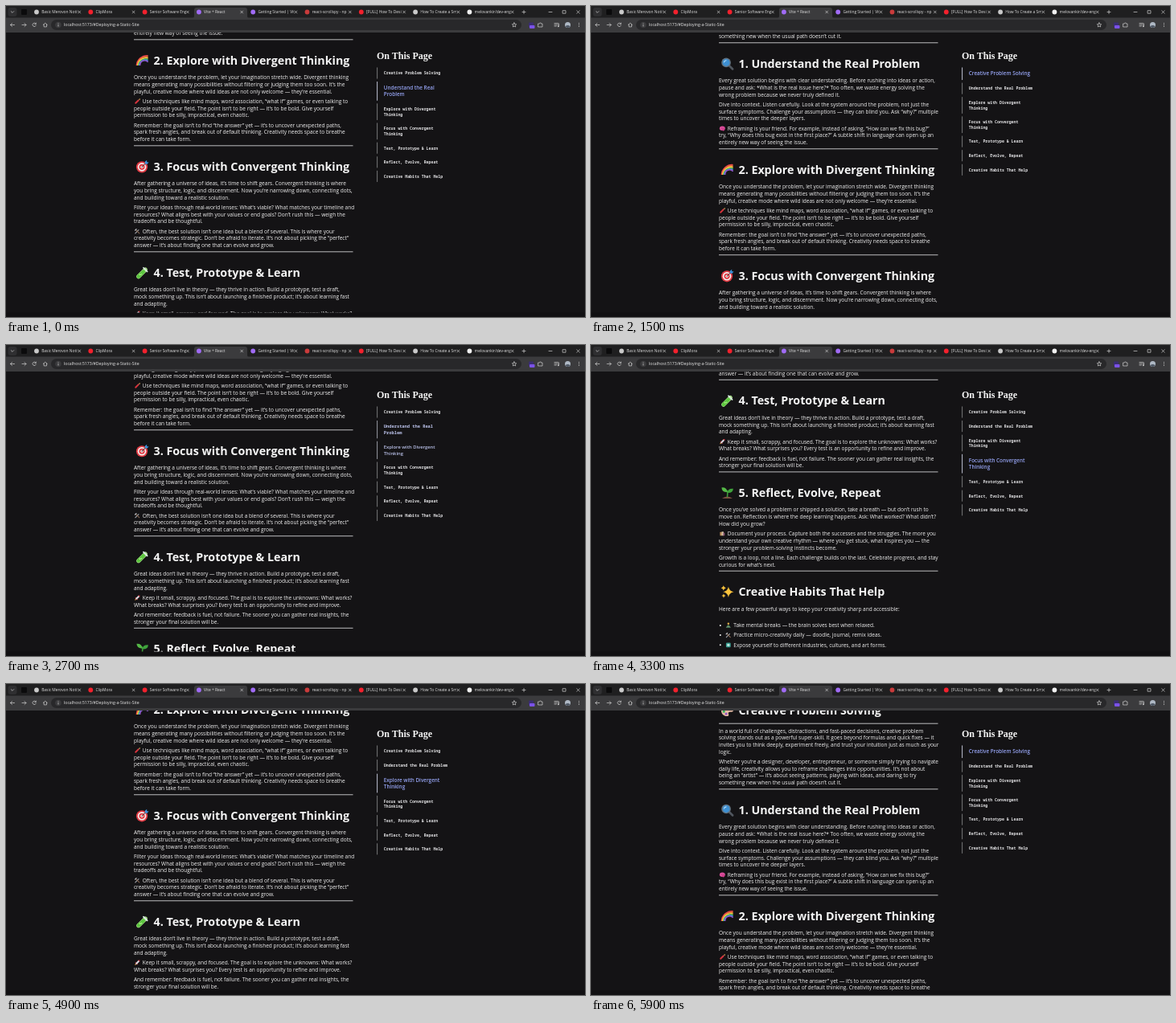
Write an HTML page that moves like this. It is 720 by 387 pixels and loops after 6400 ms.

```html
<!DOCTYPE html>
<html lang="en">
<head>
<meta charset="utf-8">
<title>Scroll spy page</title>
<style>
  html, body { margin: 0; width: 100%; height: 100%; overflow: hidden; background: #141315; }
  svg { display: block; }
  text { font-family: "Open Sans", "Noto Sans", sans-serif; fill: #f2f2f2; white-space: pre; }
  .body { font-size: 6.52px; font-weight: 500; }
  .head { font-size: 14.25px; font-weight: 700; fill: #f5f5f5; }
  .title { font: 700 12px "Liberation Serif", serif; fill: #f5f5f5; }
  .mono { font-family: "Noto Sans Mono", monospace; font-weight: 600; }
  .sans { font-weight: 600; }
  .tab { font-size: 4.9px; fill: #e2e2e2; }
  .url { font-size: 5.15px; fill: #e8e8e8; }
  .line { fill: none; stroke: #d0d0d0; stroke-width: .7; stroke-linecap: round; stroke-linejoin: round; }
</style>
</head>
<body>
<svg id="stage" width="720" height="387" viewBox="0 0 720 387">
  <rect width="720" height="387" fill="#141315"/>
  <g id="doc"></g>
  <text class="title" x="461" y="66">On This Page</text>
  <g id="nav"></g>
  <rect y="381.5" width="720" height="5.5" fill="#111012"/>
  <g id="chrome"></g>
</svg>
<script>
const LOOP = 6400, STEP = 100;
const $ = id => document.getElementById(id);

// Shape helpers
const rect = (x, y, w, h, fill, r = 0) =>
  `<rect x="${x}" y="${y}" width="${w}" height="${h}" rx="${r}" fill="${fill}"/>`;
const disc = (x, y, r, fill) => `<circle cx="${x}" cy="${y}" r="${r}" fill="${fill}"/>`;
const fill = (d, color) => `<path d="${d}" fill="${color}"/>`;
const stroke = (d, color, w) =>
  `<path d="${d}" fill="none" stroke="${color}" stroke-width="${w}" stroke-linecap="round"/>`;
const line = d => `<path class="line" d="${d}"/>`;
const esc = s => s.replace(/&/g, '&amp;').replace(/</g, '&lt;');
const text = (cls, x, y, s, extra = '') => `<text class="${cls}" x="${x}" y="${y}" ${extra}>${esc(s)}</text>`;
const star = (x, y, r) =>
  fill(`M${x} ${y - r}Q${x + r * .15} ${y - r * .15} ${x + r} ${y}Q${x + r * .15} ${y + r * .15} ${x} ${y + r}` +
    `Q${x - r * .15} ${y + r * .15} ${x - r} ${y}Q${x - r * .15} ${y - r * .15} ${x} ${y - r}`, '#f9c23c');

// Pictograms in an 18 x 18 box
const icons = {
  palette: fill('M9 1.5C4 1.5 1 5 1 9s3 7.5 7.5 7.5c3 0 2.5-2 2-3-.6-1.5.5-2.5 2-2.5h2c2 0 2.5-1.5 2.5-3C17 4 13.5 1.5 9 1.5', '#e3b9a2') +
    disc(5, 6, 1.6, '#2f7fe0') + disc(9.5, 4.5, 1.6, '#e8413f') + disc(13.5, 7, 1.6, '#f5c542') +
    disc(4.5, 10.5, 1.6, '#35b35c') + disc(7.5, 13.5, 1.5, '#8f52c7'),
  lens: stroke('M11 11L16 16', '#50565e', 2.8) + disc(7.5, 7.5, 6.2, '#62727f') + disc(7.5, 7.5, 4.7, '#3d8fd2') +
    stroke('M4.8 7Q5.2 5 7.5 4.7', '#b7e0fb', 1.2),
  rainbow: ['#e9454b', '#f58a3a', '#f7d44b', '#45b95b', '#3c8de0', '#8d57c9'].map((c, i) =>
    `<path d="M${1.5 + i * .9} 15.5A${14 - i * 1.6} ${14 - i * 1.6} 0 0 1 16.5 ${2.5 + i * 1.7}" fill="none" stroke="${c}" stroke-width="1.7"/>`).join(''),
  target: disc(8.5, 9.5, 7.5, '#e03a43') + disc(8.5, 9.5, 5.6, '#f4f0f0') + disc(8.5, 9.5, 3.8, '#e03a43') +
    disc(8.5, 9.5, 1.8, '#f4f0f0') + stroke('M8.5 9.5L14 4', '#6b4a4a', 1.2) + fill('M12.5 5.5V2.5L15 .5V3L17.5 3.2L15.5 5.6Z', '#3b93dd'),
  tube: stroke('M4 14L13 5', '#a9dc8c', 5.6) + stroke('M4 14L10.5 7.5', '#5cc63f', 4.6) +
    stroke('M10.5 2.5L15.5 7.5', '#dfeceb', 1.8) + disc(6, 11.5, .9, '#c9f7a4') + disc(8, 11, .7, '#c9f7a4'),
  plant: fill('M2 16.5Q9 11 16 16.5Z', '#7c5141') + stroke('M9 14Q9.5 9 9 6.5', '#3f9a3a', 1.7) +
    fill('M9 8Q2 8.5 1.5 2Q8.5 1.5 9 8', '#55b947') + fill('M9 9Q16.5 9.5 16.8 3.5Q9.5 3 9 9', '#3fa23c'),
  sparkles: star(10.5, 9, 7) + star(4, 3.8, 3.2) + star(4.2, 14, 2.8),
  brain: '<ellipse cx="9" cy="8.5" rx="8.2" ry="6.5" fill="#e0509f"/>' + disc(12, 13, 3.5, '#c93c88') +
    stroke('M3.5 9Q7 5 9 9Q11 5 14.5 8', '#9d2969', 1),
  cracker: stroke('M4 14L12 6', '#d5333c', 4.8) + stroke('M13 5Q14 2 16 2.5', '#b8a089', 1.5) + disc(16, 2.5, 1.5, '#f7b93f'),
  tools: stroke('M3 15L13 5', '#a9adb3', 2.5) + stroke('M4 4L15 15', '#8a6a55', 2.5) + stroke('M2.5 6L6 2.5', '#b8bcc2', 3),
  rocket: stroke('M6 12L13 5', '#d9dce2', 5) + fill('M11 2L16.5 1.5L16 7Z', '#dc3e4a') + fill('M2 9L6 7L5 11ZM9 16L11 12L7 13Z', '#dc3e4a') +
    fill('M1.5 16.5L3 12L6 15Z', '#f5a63b'),
  books: rect(2, 4, 6, 11, '#b98a55', 1) + rect(7, 3, 6, 12, '#d9c7a5', 1) + rect(11, 6, 5, 9, '#8f5d78', 1),
  calm: disc(9, 4, 3, '#e2b04a') + fill('M4 12Q9 4 14 12L16.5 16H1.5Z', '#5f8d6a'),
  world: rect(2, 2, 14, 14, '#3a9d92', 3) + disc(9, 9, 4, '#bfe6dc'),
  pen: stroke('M4 14L14 4', '#e0b35a', 3) + stroke('M3 16H10', '#d8d8d8', 1.5),
  hands: disc(6, 9, 4.5, '#e2b04a') + disc(12, 9, 4.5, '#cf9a3c')
};
const icon = (name, x, y, size) =>
  `<g transform="translate(${x - size / 2} ${y - size / 2}) scale(${size / 18})">${icons[name]}</g>`;

// Each paragraph: lines joined by "|", with an optional "icon:" prefix
const sections = [
  ['palette', 'Creative Problem Solving',
    'In a world full of challenges, distractions, and fast-paced decisions, creative problem|solving stands out as a powerful super-skill. It goes beyond formulas and quick fixes — it|invites you to think deeply, experiment freely, and trust your intuition just as much as your|logic.',
    'Whether you’re a designer, developer, entrepreneur, or someone simply trying to navigate|daily life, creativity allows you to reframe challenges into opportunities. It’s not about|being an “artist” — it’s about seeing patterns, playing with ideas, and daring to try|something new when the usual path doesn’t cut it.'],
  ['lens', '1. Understand the Real Problem',
    'Every great solution begins with clear understanding. Before rushing into ideas or action,|pause and ask: *What is the real issue here?* Too often, we waste energy solving the|wrong problem because we never truly defined it.',
    'Dive into context. Listen carefully. Look at the system around the problem, not just the|surface symptoms. Challenge your assumptions — they can blind you. Ask “why?” multiple|times to uncover the deeper layers.',
    'brain:Reframing is your friend. For example, instead of asking, “How can we fix this bug?”|try, “Why does this bug exist in the first place?” A subtle shift in language can open up an|entirely new way of seeing the issue.'],
  ['rainbow', '2. Explore with Divergent Thinking',
    'Once you understand the problem, let your imagination stretch wide. Divergent thinking|means generating many possibilities without filtering or judging them too soon. It’s the|playful, creative mode where wild ideas are not only welcome — they’re essential.',
    'cracker:Use techniques like mind maps, word association, “what if” games, or even talking to|people outside your field. The point isn’t to be right — it’s to be bold. Give yourself|permission to be silly, impractical, even chaotic.',
    'Remember: the goal isn’t to find “the answer” yet — it’s to uncover unexpected paths,|spark fresh angles, and break out of default thinking. Creativity needs space to breathe|before it can take form.'],
  ['target', '3. Focus with Convergent Thinking',
    'After gathering a universe of ideas, it’s time to shift gears. Convergent thinking is where|you bring structure, logic, and discernment. Now you’re narrowing down, connecting dots,|and building toward a realistic solution.',
    'Filter your ideas through real-world lenses: What’s viable? What matches your timeline and|resources? What aligns best with your values or end goals? Don’t rush this — weigh the|tradeoffs and be thoughtful.',
    'tools:Often, the best solution isn’t one idea but a blend of several. This is where your|creativity becomes strategic. Don’t be afraid to iterate. It’s not about picking the “perfect”|answer — it’s about finding one that can evolve and grow.'],
  ['tube', '4. Test, Prototype & Learn',
    'Great ideas don’t live in theory — they thrive in action. Build a prototype, test a draft,|mock something up. This isn’t about launching a finished product; it’s about learning fast|and adapting.',
    'rocket:Keep it small, scrappy, and focused. The goal is to explore the unknowns: What works?|What breaks? What surprises you? Every test is an opportunity to refine and improve.',
    'And remember: feedback is fuel, not failure. The sooner you can gather real insights, the|stronger your final solution will be.'],
  ['plant', '5. Reflect, Evolve, Repeat',
    'Once you’ve solved a problem or shipped a solution, take a breath — but don’t rush to|move on. Reflection is where the deep learning happens. Ask: What worked? What didn’t?|How did you grow?',
    'books:Document your process. Capture both the successes and the struggles. The more you|understand your own creative rhythm — where you get stuck, what inspires you — the|stronger your problem-solving instincts become.',
    'Growth is a loop, not a line. Each challenge builds on the last. Celebrate progress, and stay|curious for what’s next.'],
  ['sparkles', 'Creative Habits That Help', 'Here are a few powerful ways to keep your creativity sharp and accessible:']
];
const habits = [
  ['calm', 'Take mental breaks — the brain solves best when relaxed.'],
  ['tools', 'Practice micro-creativity daily — doodle, journal, remix ideas.'],
  ['world', 'Expose yourself to different industries, cultures, and art forms.'],
  ['pen', 'Write down ideas as they come — even the odd ones.'],
  ['hands', 'Share early drafts and welcome honest feedback.']
];

function buildDoc() {
  const rule = y => rect(159, y - .55, 272.5, 1.1, '#adadaf');
  let y = 74.4, out = '';
  sections.forEach(([pic, title, ...paras], n) => {
    out += icon(pic, 169.5, y, 17) + text('head', 183.5, y + 5, title);
    if (n === 0) out += rule(y + 16.3);
    y += n === 0 ? 25.4 : 21.1;
    paras.forEach((para, i) => {
      const [, pic, body] = para.match(/^(?:([a-z]+):)?(.*)$/);
      if (i) y += 12.3;
      body.split('|').forEach((s, k) => {
        if (k) y += 8.7;
        const lead = pic && !k;
        if (lead) out += icon(pic, 163.3, y, 7.5);
        out += text('body', lead ? 169.8 : 159, y + 2.3, s);
      });
    });
    if (n < sections.length - 1) {
      out += rule(y + 8);
      y += 34.1;
    }
  });
  habits.forEach(([pic, s], i) => {
    const h = y + 20.5 + i * 12.2;
    out += disc(160.8, h, 1, '#f2f2f2') + icon(pic, 170.8, h, 7.5) + text('body', 177.3, h + 2.3, s);
  });
  $('doc').innerHTML = out;
}

function buildChrome() {
  const tabs = [
    ['#c9c9c9', 'Basic Merovon Notifi'], ['#f2212d', 'ClipMora'], ['#f2212d', 'Senior Software Eng'],
    ['#a06bf5', 'Vite + React'], ['#a06bf5', 'Getting Started | Vit'], ['#c93b3b', 'react-scrollspy - np'],
    ['#f2212d', '[FULL] How To Desi'], ['#c9c9c9', 'How To Create a Sm'], ['#f0f0f0', 'melovankir/dev-eng']
  ];
  const cross = (x, y, r) => line(`M${x - r} ${y - r}l${2 * r} ${2 * r}m0 ${-2 * r}l${-2 * r} ${2 * r}`);
  let out = rect(0, 0, 720, 15, '#1f1f20') + rect(0, 14.5, 720, 18.5, '#3b3b3d') +
    rect(2.5, 2, 11, 11, '#2f2f31', 3) + line('M6.3 6.7l1.7 1.7l1.7-1.7') +
    rect(19, 4, 7, 7, '#0b0b0c', 1) +
    `<path d="M232 15Q234 15 234 12V5Q234 2 237 2H297Q300 2 300 5V12Q300 15 302 15Z" fill="#3b3b3d"/>`;
  tabs.forEach(([color, title], i) => {
    const x = 38 + i * 67.3;
    out += disc(x, 7.5, 2.9, color) +
      `<svg x="${x + 6.2}" y="0" width="45" height="15">${text('tab', 0, 9.3, title)}</svg>` +
      cross(x + 53.3, 7.5, 1.4);
  });
  out += line('M642 7.5h4m-2-2v4M675 7.5h4') +
    `<rect class="line" x="692.5" y="5.7" width="3.5" height="3.5"/>` + cross(711.5, 7.5, 1.7) +
    rect(56, 17, 585, 13, '#28282a', 6.5) +
    line('M10.5 23.5h-5m2-2l-2 2l2 2M20 23.5h5m-2-2l2 2l-2 2M37 22a2.2 2.2 0 1 0 .3 2.2m0-3.2v1.5h-1.5') +
    line('M46.3 23.5l2.5-2.3l2.5 2.3m-4.2-.6v3h3.4v-3') +
    disc(65, 23.5, 3.8, '#3b3b3d') + line('M65 23.2v2M65 21.6v.1') +
    text('url', 72, 25.4, 'localhost:5173/#Deploying-a-Static-Site') +
    line('M632 20.8l.8 1.8l1.9.2l-1.4 1.3l.4 1.9l-1.7-1l-1.7 1l.4-1.9l-1.4-1.3l1.9-.2z') +
    rect(650, 20.5, 6, 6, '#3a2d70', 1) + rect(651, 24, 6.5, 4, '#7b52e8', 1) +
    line('M662 22h1.5a1 1 0 0 1 2 0h1.5v4h-5z') +
    line('M682 21.5h4.5M682 23.3h4.5M682 25.1h2.5M687.5 22v3.2') + disc(686.8, 25.3, .9, '#d0d0d0') +
    disc(698.5, 23.5, 3.5, '#aeb8c4') + fill('M695.5 25.2a3.5 3.5 0 0 0 6 0q-3-2.5-6 0', '#4c5663') +
    [21.5, 23.5, 25.5].map(y => disc(712.5, y, .55, '#d0d0d0')).join('');
  $('chrome').innerHTML = out;
}

// Motion: start, end, from, to, easing
const linear = u => u;
const smooth = u => u * u * (3 - 2 * u);
const easeOut = u => Math.sin(u * Math.PI / 2);
const scrolls = [
  [0, 750, 262.5, 0, easeOut],
  [1200, 1600, 0, 150, smooth],
  [1810, 2210, 150, 225, smooth],
  [2300, 3300, 225, 525, smooth],
  [3600, 3950, 525, 566.5, smooth],
  [4063, 5703, 566.5, 41.5, linear]
];
const switches = [[-1000, 1], [400, 0], [2000, 1], [2600, 2], [2900, 3], [3900, 4], [4300, 3], [4700, 2], [5100, 1], [5500, 0]];
const GROW = 200, SMALL = 5.3, BIG = 6.35, NAV_W = 83;

const clamp = u => Math.min(1, Math.max(0, u));
const mix = (a, b, u) => a + (b - a) * u;
const blend = (a, b, u) => `rgb(${a.map((v, i) => Math.round(mix(v, b[i], u)))})`;

function scrollAt(t) {
  const [a, b, from, to, ease] = scrolls.filter(s => s[0] <= t).pop();
  return mix(from, to, ease(clamp((t - a) / (b - a))));
}

function wrap(s, charW) {
  const lines = [''];
  s.split(' ').forEach(word => {
    const last = lines[lines.length - 1], joined = last ? last + ' ' + word : word;
    if (joined.length * charW <= NAV_W) lines[lines.length - 1] = joined;
    else lines.push(word);
  });
  return lines;
}

// The active link takes the sans face at once, while its size and colour ease in
function drawNav(t) {
  const k = switches.filter(s => s[0] <= t).length - 1;
  const [since, now] = switches[k], before = k ? switches[k - 1][1] : -1;
  const p = smooth(clamp((t - since) / GROW));
  let top = 80.2, out = '';
  sections.forEach(([, title], i) => {
    const on = i === now, u = on ? p : i === before ? 1 - p : 0;
    const size = mix(SMALL, BIG, u), lh = mix(6.6, 8.1, u);
    const lines = wrap(title.replace(/^\d\. /, ''), size * (on ? .509 : .555));
    const h = lines.length * lh;
    out += rect(461, top - 3.75, 1.1, h + 7.5, blend([108, 108, 110], [172, 174, 190], u));
    lines.forEach((s, n) => {
      const y = top + (n + .5) * lh + size * .34;
      const look = `font-size="${on ? size : size * .925}" style="fill:${blend([228, 228, 230], [150, 164, 243], u)}"`;
      out += text(on ? 'sans' : 'mono', 469.8, y, s, look);
    });
    top += h + 11;
  });
  $('nav').innerHTML = out;
}

let shown = -1;
function frame(now) {
  const t = Math.floor(now % LOOP / STEP) * STEP;
  if (t !== shown) {
    shown = t;
    $('doc').setAttribute('transform', `translate(0 ${-scrollAt(t)})`);
    drawNav(t);
  }
  requestAnimationFrame(frame);
}

buildDoc();
buildChrome();
frame(0);
</script>
</body>
</html>
```
